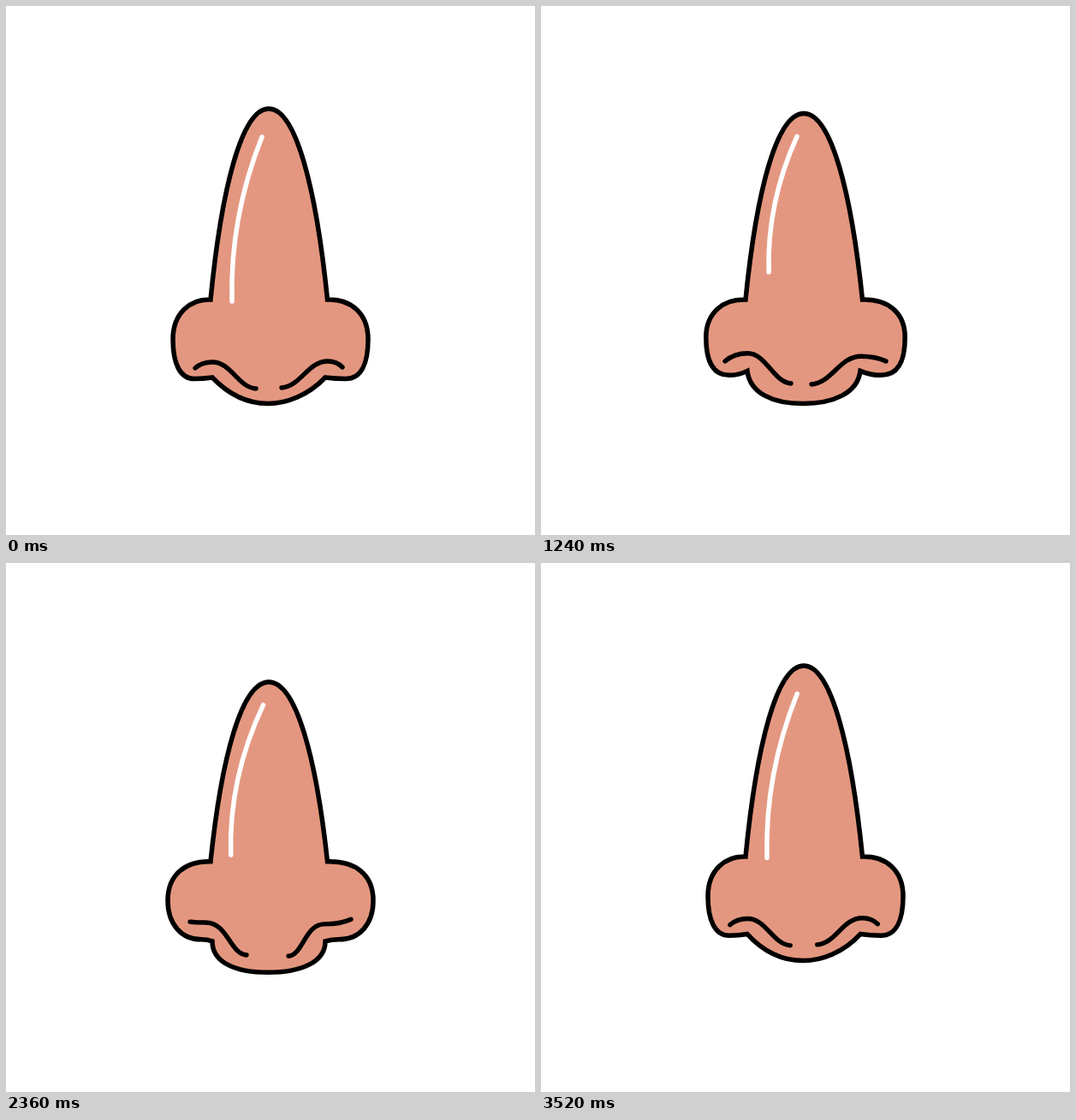
Animation of 618 by 618 pixels, one loop 3560 ms. Source, as an HTML page with a canvas:

```html
<!DOCTYPE html>
<html lang="en">
<head>
<meta charset="utf-8">
<title>Nose</title>
<style>
  html, body { margin: 0; width: 100%; height: 100%; overflow: hidden; background: #fff; }
  canvas { display: block; }
</style>
</head>
<body>
<canvas id="stage" width="618" height="618"></canvas>
<script>
const ctx = document.getElementById('stage').getContext('2d');
const LOOP = 3560, STEP = 40;
const INHALED = 680, SNEEZE = 2160, SETTLED = 2500;

const ramp = (t, from, to) => Math.min(1, Math.max(0, (t - from) / (to - from)));
// rises from a to b, holds, falls from c to d
const swell = (t, a, b, c, d) => ramp(t, a, b) * (1 - ramp(t, c, d));

// The pose is a rest shape plus these amounts, each from 0 to 1.
function muscles(t) {
  return {
    lift: swell(t, 0, INHALED, 2600, LOOP),
    spread: swell(t, INHALED, 1240, 2360, LOOP),
    flare: ramp(t, INHALED, 1680) ** 1.7 * (1 - ramp(t, 2360, 2800)),
    pinch: swell(t, 1240, 2360, 2960, LOOP),
    drop: swell(t, 1680, SNEEZE, SNEEZE, SETTLED),
    sag: ramp(t, INHALED, SNEEZE) ** 2.2 * (1 - ramp(t, SNEEZE, SETTLED)),
    shorten: swell(t, 0, INHALED, 1240, 1640)
  };
}

function stroke(color, width) {
  ctx.strokeStyle = color;
  ctx.lineWidth = width;
  ctx.stroke();
}

function drawOutline({ lift, flare, drop, sag }) {
  const apexX = 307, left = 239, right = 375.5, centre = 306;
  const apexY = 120 + 46 * sag;
  const joint = 343 + 14 * drop;
  const shoulder = joint - (joint - apexY) * 0.574;
  const wingL = 195 - 6 * flare, wingR = 423 + 6 * flare;
  const wingBottom = 435.5 - 6 * lift + 5 * flare + 13 * drop;
  const mid = (joint + wingBottom) / 2;
  const upper = mid - (mid - joint) * 0.65, lower = mid + 28;
  const round = 20 * drop;
  const notchL = 241, notchR = 373;
  const notchY = 434 - 11 * lift + 9 * flare + 24 * drop;
  const bottom = 464.5 + 33.5 * drop;
  const slope = 20 - 15 * lift - 5 * flare;
  const reach = 38 - slope * 0.8, cheek = notchY + (bottom - notchY) * 0.68;

  ctx.beginPath();
  ctx.moveTo(left, joint);
  ctx.bezierCurveTo(251.5, shoulder, apexX - 32, apexY, apexX, apexY);
  ctx.bezierCurveTo(apexX + 32, apexY, 362.5, shoulder, right, joint);
  ctx.bezierCurveTo(wingR - 20, joint - 1, wingR, upper, wingR, mid);
  ctx.bezierCurveTo(wingR, lower, wingR - 8 - round, wingBottom, 397 - round, wingBottom);
  ctx.quadraticCurveTo(385 - round / 2, wingBottom, notchR, notchY);
  ctx.bezierCurveTo(notchR - slope, cheek, centre + reach, bottom, centre, bottom);
  ctx.bezierCurveTo(centre - reach, bottom, notchL + slope, cheek, notchL, notchY);
  ctx.quadraticCurveTo(231 + round / 2, wingBottom, 220 + round, wingBottom);
  ctx.bezierCurveTo(wingL + 8 + round, wingBottom, wingL, lower, wingL, mid);
  ctx.bezierCurveTo(wingL, upper, wingL + 20, joint - 1, left, joint);
  ctx.closePath();
  ctx.fillStyle = '#e49780';
  ctx.fill();
  stroke('#000', 5.5);
}

function drawNostril(outer, crest, inner, pinch) {
  const [ox, oy] = outer, [cx, cy] = crest, [ix, iy] = inner;
  const dx = ix - cx;
  ctx.beginPath();
  ctx.moveTo(ox, oy);
  ctx.quadraticCurveTo(ox + (cx - ox) * 0.4, cy, cx, cy);
  ctx.bezierCurveTo(cx + dx * (0.43 + 0.12 * pinch), cy, ix - dx * 0.42, iy - 2, ix, iy);
  stroke('#000', 5.4);
}

function drawNostrils({ lift, spread, flare, pinch, drop }) {
  drawNostril(
    [221 - lift - 5 * spread, 423 - 4 * lift - 4 * spread + 10 * drop],
    [241 + 2 * lift - 4 * flare - 15 * drop, 416 - 13 * lift + 7.5 * flare + 23 * drop],
    [292 - 11 * pinch, 447 - 6 * lift - 3 * spread + 8 * flare + 3 * pinch + 22 * drop],
    pinch);
  drawNostril(
    [393 + 2 * lift + 8 * spread, 422 - 2 * lift - 5 * spread + 3 * drop],
    [376 - 3 * lift + 2 * flare - 3 * pinch, 415 - 7.5 * lift + 4.5 * flare + 24 * drop],
    [322 - lift - 5 * spread + 14 * pinch, 446 - 2 * lift - 5 * spread + 8 * flare + 2 * pinch + 25 * drop],
    pinch);
}

function drawShine({ lift, flare, pinch, drop, sag, shorten }) {
  const x0 = 299 + lift + 3 * pinch - 2.5 * flare;
  const y0 = 153 - 6 * lift + 46 * sag;
  const x1 = 264 + 4 * shorten - 5 * flare + 9 * drop;
  const y1 = 345 - 36 * shorten - 9 * pinch + 5 * flare;
  const at = (u, v) => [x0 + (x1 - x0) * u, y0 + (y1 - y0) * v];
  ctx.beginPath();
  ctx.moveTo(x0, y0);
  ctx.bezierCurveTo(...at(0.7, 0.32), ...at(1.05, 0.655), x1, y1);
  stroke('#fff', 5.5);
}

function frame(now) {
  const pose = muscles(Math.floor((now % LOOP) / STEP) * STEP);
  ctx.fillStyle = '#fff';
  ctx.fillRect(0, 0, 618, 618);
  ctx.lineCap = 'round';
  drawOutline(pose);
  drawNostrils(pose);
  drawShine(pose);
  requestAnimationFrame(frame);
}

frame(0);
</script>
</body>
</html>
```
